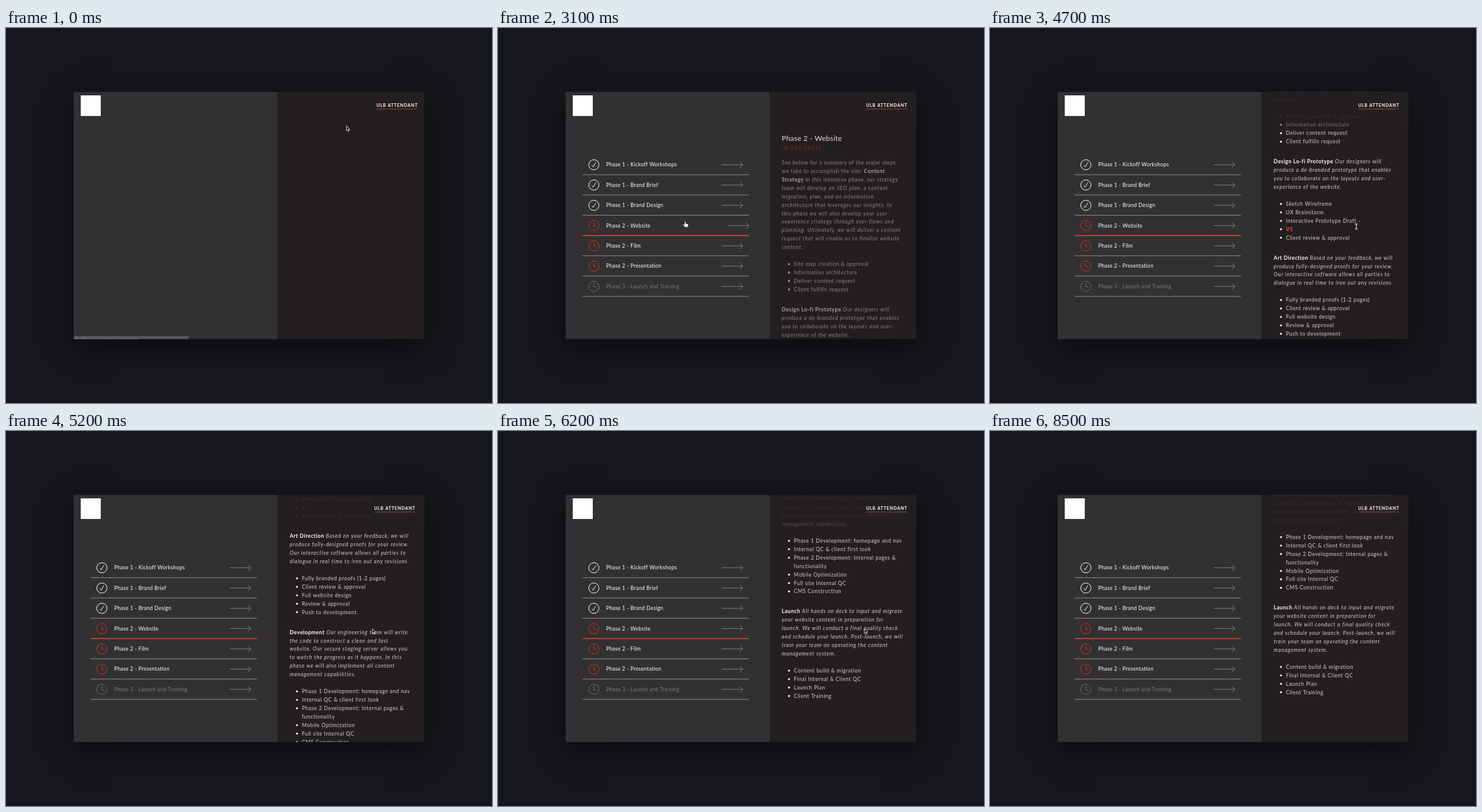
An HTML page with a canvas for the animation above (8.6 s loop, 800 px wide and 618 px high).

```html
<!DOCTYPE html>
<html lang="en">
<head>
<meta charset="utf-8">
<title>Project tracker</title>
<style>
  html, body { margin: 0; height: 100%; overflow: hidden; background: #15171c; }
  canvas { display: block; }
</style>
</head>
<body>
<canvas id="stage" width="800" height="618"></canvas>
<script>
const ctx = document.getElementById('stage').getContext('2d');
const LOOP = 8600, STEP = 100;
const WIN = { x: 111.5, y: 105.5, w: 577, h: 407, split: 447 };
const ROW = 33.4, LINE = 13.92;
const RED = '#d63226', WHITE = '#fff', GREY = '#6f6d6f', PANEL = '#231f20';

const rows = ['Phase 1 - Kickoff Workshops', 'Phase 1 - Brand Brief', 'Phase 1 - Brand Design',
  'Phase 2 - Website', 'Phase 2 - Film', 'Phase 2 - Presentation', 'Phase 3 - Launch and Training'];
// Row index: [pointer enters, pointer leaves]
const hovers = { 1: [1580, 1750], 2: [1750, 2100], 3: [2100, 3350] };

const overview = `This is our project tracker! This is a live link
that will always be open for you to check the
progress, review previously approved work,
and basically see where we’re at from an
entire deliverable standpoint. We’re building
out the rest of this as we work to kick this off.`.split('\n');

// * toggles bold, _ toggles italic, "- " starts a bullet, "> " continues one
const details = `See below for a summary of the major steps
we take to accomplish the site: *Content
Strategy* In this intensive phase, _our strategy
team will develop an SEO plan, a content
migration, plan, and an information
architecture that leverages our insights. In
this phase we will also develop your user-
experience strategy through user-flows and
planning. Ultimately, we will deliver a content
request that will enable us to finalize website
content._
- Site map creation & approval
- Information architecture
- Deliver content request
- Client fulfills request
*Design Lo-fi Prototype* _Our designers will
produce a de-branded prototype that enables
you to collaborate on the layouts and user-
experience of the website._
- Sketch Wireframe
- UX Brainstorm
- Interactive Prototype Draft -
- V1
- Client review & approval
*Art Direction* _Based on your feedback, we will
produce fully-designed proofs for your review.
Our interactive software allows all parties to
dialogue in real time to iron out any revisions._
- Fully branded proofs (1-2 pages)
- Client review & approval
- Full website design
- Review & approval
- Push to development
*Development* _Our engineering team will write
the code to construct a clean and fast
website. Our secure staging server allows you
to watch the progress as it happens. In this
phase we will also implement all content
management capabilities._
- Phase 1 Development: homepage and nav
- Internal QC & client first look
- Phase 2 Development: Internal pages &
> functionality
- Mobile Optimization
- Full site Internal QC
- CMS Construction
*Launch* _All hands on deck to input and migrate
your website content in preparation for
launch. We will conduct a final quality check
and schedule your launch. Post-launch, we will
train your team on operating the content
management system._
- Content build & migration
- Final Internal & Client QC
- Launch Plan
- Client Training`.split('\n');

const clamp = v => Math.max(0, Math.min(1, v));
const smooth = u => u * u * (3 - 2 * u);
const easeOut = u => 1 - (1 - u) ** 3;
const ramp = (t, a, b) => clamp((t - a) / (b - a));

function track(t, keys, ease = smooth) {
  let value = keys[0][1];
  for (let i = 1; i < keys.length; i++)
    value += (keys[i][1] - keys[i - 1][1]) * ease(ramp(t, keys[i - 1][0], keys[i][0]));
  return value;
}

function text(str, x, y, { size = 8.6, weight = 400, italic = '', color = WHITE,
  spacing = 0.28, family = 'Lato' } = {}) {
  ctx.font = `${italic} ${weight} ${size}px ${family}, sans-serif`;
  ctx.letterSpacing = spacing + 'px';
  ctx.fillStyle = color;
  ctx.fillText(str, x, y);
  return ctx.measureText(str).width;
}

function stroke(color, width, ...points) {
  ctx.strokeStyle = color;
  ctx.lineWidth = width;
  ctx.beginPath();
  points.forEach(([x, y]) => ctx.lineTo(x, y));
  ctx.stroke();
}

function circle(x, y, r, color, width) {
  ctx.beginPath();
  ctx.arc(x, y, r, 0, 7);
  if (width) {
    ctx.strokeStyle = color;
    ctx.lineWidth = width;
    ctx.stroke();
  } else {
    ctx.fillStyle = color;
    ctx.fill();
  }
}

function rect(color, x, y, w, h) {
  ctx.fillStyle = color;
  ctx.fillRect(x, y, w, h);
}

function drawWindow() {
  rect('#15171c', 0, 0, 800, 618);
  ctx.save();
  ctx.shadowColor = 'rgba(0,0,0,.55)';
  ctx.shadowBlur = 44;
  ctx.shadowOffsetY = 12;
  rect(PANEL, WIN.x, WIN.y, WIN.w, WIN.h);
  ctx.restore();
  rect('#323032', WIN.x, WIN.y, WIN.split - WIN.x, WIN.h);
}

function hoverAmount(t, i) {
  if (!hovers[i]) return 0;
  const [enter, leave] = hovers[i];
  return clamp(ramp(Math.min(t, leave), enter, enter + 430) - Math.max(0, t - leave) / 430);
}

function drawRow(t, i) {
  const y = 225.4 + ROW * i, lineY = y + 16.4, hover = hoverAmount(t, i);
  const color = i < 3 ? WHITE : i < 6 ? RED : GREY;
  circle(157.8, y, 8.4, color, 1);
  if (i < 3) stroke(color, 0.9, [154.6, y + 0.8], [156.6, y + 3.6], [161, y - 4]);
  else stroke(color, 1, [157.7, y - 5.2], [157.7, y + 0.8], [162, y + 0.8]);
  text(rows[i], 178, y + 3, { color: i < 6 ? WHITE : '#7d7b7d' });

  const tip = 403 + 10 * hover;
  stroke('#a09ea0', 0.7, [tip - 35, y], [tip, y]);
  stroke('#a09ea0', 0.7, [tip - 5, y - 5], [tip, y], [tip - 5, y + 5]);

  stroke('#8f8d8f', 1, [139, lineY], [413, lineY]);
  const filled = i === 3 && t >= 2900 ? 1 : hover;
  if (filled) stroke(i < 3 ? WHITE : RED, 1.4, [139, lineY], [139 + 274 * filled, lineY]);
}

function drawOverview() {
  circle(478, 245, 7.5, WHITE);
  text('brelovan llc', 488, 249.5, { size: 13, weight: 900, spacing: -0.2, family: 'Roboto' });
  text('Overview', 471, 318, { size: 11.8, spacing: 0.25, color: '#e8e7e7' });
  overview.forEach((line, i) =>
    text(line, 471, 343.4 + i * LINE, { spacing: 0.53, color: '#aeacad' }));
}

function drawDetails(t, scroll) {
  const shown = ramp(t, 2850, 3280);
  ctx.globalAlpha = clamp(shown * 1.6);
  text('Phase 2 - Website', 467, 186.3 - scroll, { size: 11.9, color: '#ecebeb' });
  ctx.globalAlpha = shown;
  text('IN-PROGRESS', 467, 201.2 - scroll, { size: 7, spacing: 1.95, color: RED });

  let y = 222 - LINE - scroll, bold = false, italic = false, inList = false;
  for (const line of details) {
    const bullet = line.startsWith('- '), item = bullet || line.startsWith('> ');
    y += LINE + (item === inList ? 0 : item ? LINE : 19.1);
    inList = item;
    if (bullet) circle(479, y, 1.6, WHITE);
    if (line === '- V1') {
      text('V1', 487, y + 3.2, { size: 9, weight: 900, spacing: 0, color: '#ee3a2d' });
      continue;
    }
    let x = item ? 487 : 467;
    for (const part of (item ? line.slice(2) : line).split(/([*_])/)) {
      if (part === '*') bold = !bold;
      else if (part === '_') italic = !italic;
      else if (part) x += text(part, x, y + 3, {
        weight: bold ? 700 : 400,
        italic: italic ? 'italic' : '',
        spacing: bold ? 0.52 : italic ? 0.75 : 0.54,
        color: bold ? WHITE : '#d2d0d1'
      });
    }
  }
  ctx.globalAlpha = 1;

  // Header veil that hides text scrolled under it
  const veil = ctx.createLinearGradient(0, 106, 0, 172);
  veil.addColorStop(0, 'rgba(35,31,32,.92)');
  veil.addColorStop(0.66, 'rgba(35,31,32,.92)');
  veil.addColorStop(1, 'rgba(35,31,32,0)');
  rect(veil, WIN.split, 100, 242, 72);
}

function drawCursor(t) {
  const x = track(t, [[1100, 560.5], [1900, 314], [2000, 314], [2300, 308.5], [3200, 308.5],
    [3700, 603], [7350, 603], [7800, 694]]);
  const y = track(t, [[1100, 161.5], [1900, 307], [2000, 307], [2300, 319.5], [3200, 319.5],
    [3700, 326], [7350, 326], [7800, 318]]);
  ctx.save();
  ctx.translate(x, y);
  if (x > 139 && x < 413) {
    ctx.fillStyle = WHITE;
    ctx.fill(new Path2D('M-1 0h1.5v3l4 1v2.5l-1.2 2h-4L-3.5 5l.8-1L-1 5z'));
  } else if (t >= 3600 && t < 5000) {
    stroke(WHITE, 1, [-2.5, -3], [2.5, -3]);
    stroke(WHITE, 1, [0, -3], [0, 5]);
    stroke(WHITE, 1, [-2.5, 5], [2.5, 5]);
  } else {
    const arrow = new Path2D('M0 0v7.6l1.8-1.6 1.3 2.8 1.3-.6-1.3-2.7h2.4z');
    ctx.fillStyle = '#111';
    ctx.fill(arrow);
    ctx.strokeStyle = WHITE;
    ctx.lineWidth = 0.8;
    ctx.stroke(arrow);
  }
  ctx.restore();
}

function draw(t) {
  const opened = t >= 2900;
  const scroll = track(t, [[3800, 0], [4650, 243.5], [4700, 243.5], [5550, 464.2],
    [5600, 464.2], [6450, 703]], easeOut);
  const bounce = track(t, [[6400, 0], [6600, 3], [6900, 1.5], [7300, 0.7], [7800, 0]]);

  drawWindow();
  ctx.save();
  ctx.beginPath();
  ctx.rect(WIN.x, WIN.y, WIN.w, WIN.h);
  ctx.clip();

  ctx.save();
  ctx.translate(0, -bounce);
  ctx.globalAlpha = ramp(t, 250, 850);
  rows.forEach((_, i) => drawRow(t, i));
  if (opened) drawDetails(t, scroll);
  else drawOverview();
  ctx.globalAlpha = 1;

  rect(WHITE, 123, 111, 33, 34);
  const right = opened ? 673 : 677;
  text('ULB ATTENDANT', right - 67, 129.6, { size: 7, weight: 700, spacing: 0.85 });
  stroke('#b23a2e', 1, [right - 67, 133.5], [right, 133.5]);
  ctx.restore();

  if (t < 400) {
    rect('#58565a', WIN.x, 507.5, 189.5, 6);
    text('Waiting for projects.sevolaqumbretal.com...', 106, 514.5,
      { size: 6, spacing: 0, color: '#e0e0e0', family: 'Roboto' });
  }
  drawCursor(t);
  ctx.restore();
}

function frame(now) {
  draw(Math.floor((now % LOOP) / STEP) * STEP);
  requestAnimationFrame(frame);
}
requestAnimationFrame(frame);
</script>
</body>
</html>
```
